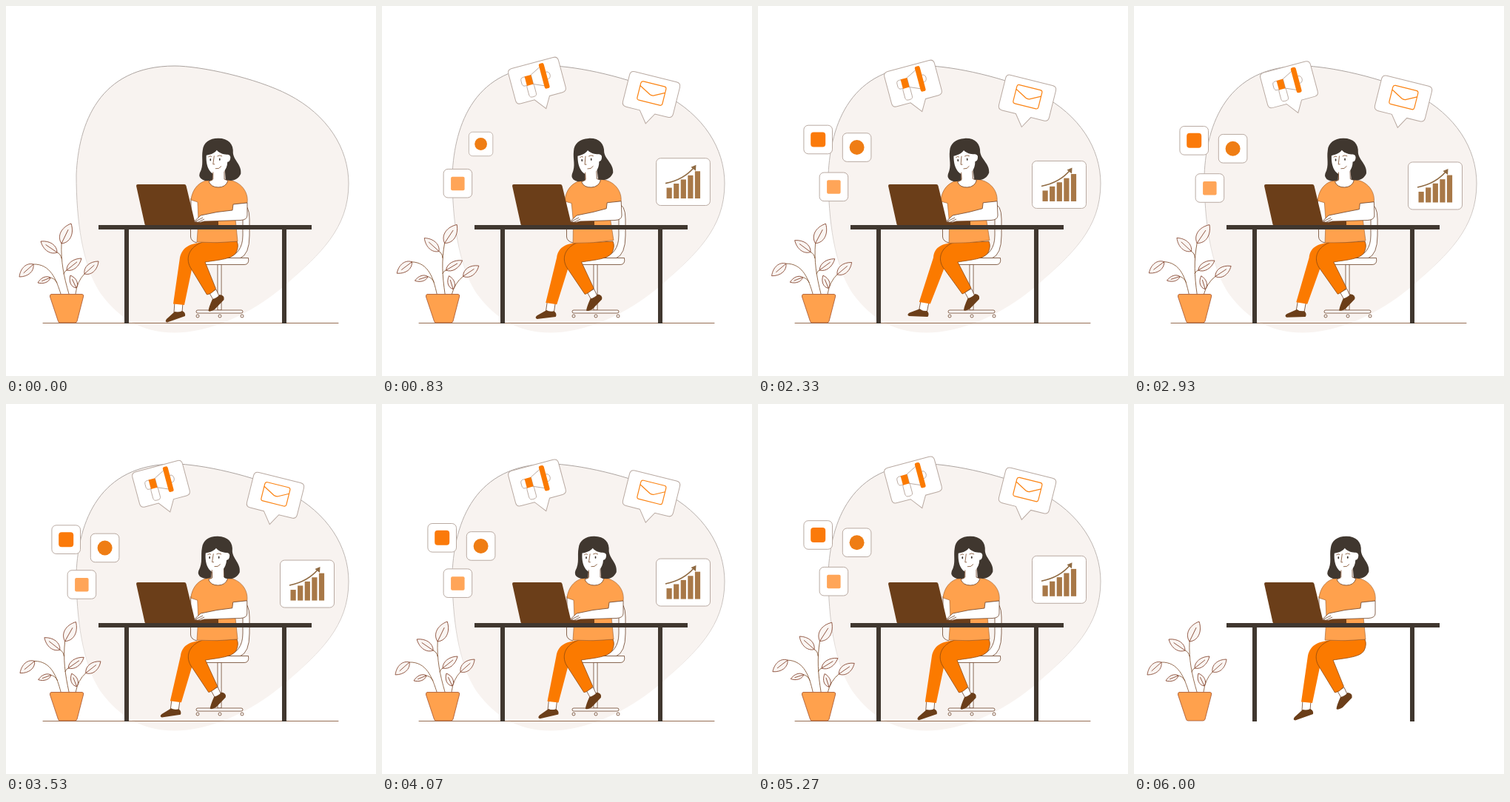
Recreate the animation shown at these times as an HTML page. Size 500x500 px, loop 6.03 s.

```html
<!DOCTYPE html>
<html lang="en">
<head>
<meta charset="utf-8">
<title>Woman working at a desk</title>
<style>
  html, body { margin: 0; width: 100%; height: 100%; overflow: hidden; background: #fff; }
  svg { display: block; width: 100%; height: 100%; }
  .line { fill: none; stroke: #7b4a27; stroke-width: .8; stroke-linecap: round; stroke-linejoin: round; }
  .skin { fill: #fff; stroke: #6b4126; stroke-width: .8; stroke-linejoin: round; }
  .shirt { fill: #ffa14d; }
  .pants { fill: #fb7a00; }
  .shoe, .laptop { fill: #6b3e19; }
  .dark { fill: #40372f; }
  .card { fill: #fff; stroke: #b9aaa2; stroke-width: 1; }
  .leaf { fill: #faf5f2; stroke: #85452f; stroke-width: .8; }
  .thin { fill: #fff; stroke: #b9a9a0; stroke-width: .9; }
</style>
</head>
<body>
<svg viewBox="0 0 500 500">
  <defs>
    <linearGradient id="rim" x1="0" y1="0" x2="0" y2="1">
      <stop offset="0" stop-color="#aaa29e"/>
      <stop offset=".5" stop-color="#c6bfbb"/>
      <stop offset=".8" stop-color="#f8f3f0"/>
    </linearGradient>
    <path id="bubble" class="card" d="M-29-24.5H29Q35-24.5 35-18.5V18.5Q35 24.5 29 24.5H11L2 40L-10 24.5H-29Q-35 24.5-35 18.5V-18.5Q-35-24.5-29-24.5Z"/>
    <rect id="tile" class="card" x="-19.3" y="-19.3" width="38.6" height="38.6" rx="6"/>
  </defs>

  <g id="scene">
    <path fill="#f8f3f0" stroke="url(#rim)" d="M228 81C262 81 338 97 382 120C434 147 463 192 463 240C463 300 425 335 378 376C330 418 272 441 228 441C180 441 150 418 128 388C103 350 95 290 95 228C98 160 125 81 228 81Z"/>
    <path class="line" stroke-width="1" d="M50 428.5H449"/>
    <g class="skin">
      <path d="M318 267Q329 268 329 288V310Q329 336 316 341H296Q320 336 320 310V270Z"/>
      <path fill="none" d="M249.500 275V312Q250 318 258 320"/>
      <rect x="286" y="349" width="5" height="62"/>
      <path d="M268 340.500H327.500Q329 349.500 322 349.500H268Z"/>
      <rect x="257" y="411" width="63" height="4" rx="2"/>
      <circle cx="259" cy="419" r="2"/><circle cx="289" cy="419" r="2"/><circle cx="319" cy="419" r="2"/>
    </g>
  </g>

  <g id="plant"></g>
  <path fill="#ffa14d" stroke="#a2512c" stroke-width=".8" d="M61 389.500H103Q105.500 390 104.500 393L96 426Q95.500 428 93 428H73Q71 428 70.500 426L59.500 393Q59 390 61 389.500Z"/>

  <path class="dark" d="M160 301H166V429H160ZM373 301H379V429H373Z"/>

  <g id="backFoot">
    <path class="skin" d="M228 400L239 401L238 414L227 414Z"/>
    <path id="backShoe" class="shoe" d="M228 413Q233 415 238 412Q243 414 242 419L218 427.500Q214 427 217 423Z"/>
  </g>
  <path id="backLeg" class="pants"/>
  <g id="frontFoot">
    <path class="skin" d="M275 388L284 383L288 392L280 397Z"/>
    <path class="shoe" d="M279 396Q286 395 288.500 390Q296 391 294.500 397L282 410Q275 414 273.500 412Q274 407 279 396Z"/>
  </g>
  <path id="frontLeg" class="pants" stroke="#8d4a10" stroke-width=".8"/>

  <g id="body">
    <path class="skin" d="M250 260L250 284L256 292L264 291L259 262Z"/>
    <path class="shirt" stroke="#9a5a28" stroke-width=".6" d="M276 235C262 236 252 246 250 262L259 265L260 290L258 319Q285 321 313 318L308 268L326 266C328 252 318 237 300 235Z"/>
    <path class="skin" d="M279 221V235L274 237Q277 245 287 245Q297 245 300 236L295 234V218Z"/>
    <g id="head">
      <path class="dark" d="M286 178C300 178 307 186 306 198C307 208 318 214 316.500 226C313 234 305 237 296 234L295 221L279 221L278 234Q271 237 265 234Q259 231 261 225C267 214 263 205 265 194C266 184 274 178 286 178Z"/>
      <path fill="#fff" d="M270 201C276 200 281 198 284 194C288 199 295 200 299 200Q304 201 302 207Q301 210 298.500 210C298 221 291 227.500 284.500 227.500C274 227 269 215 270 201Z"/>
      <path class="line" stroke="#40372f" d="M280.500 202L279 213H281M282.500 219Q287 220 290 216M273 203Q275 201 277 202.500M285 202Q288 200 291 202M279 224V233"/>
      <ellipse class="dark" cx="275.500" cy="207" rx=".9" ry="1.700"/>
      <ellipse class="dark" cx="288" cy="206.500" rx=".9" ry="1.700"/>
    </g>
  </g>

  <path class="laptop" d="M178 241H241Q243 241 243.500 243L255 291H287V297H190Q188 297 187.500 295L176 243Q176 241 178 241Z"/>
  <path id="forearm" class="skin"/>
  <rect class="dark" x="125" y="296" width="288" height="6"/>

  <g id="horn">
    <use href="#bubble"/>
    <rect class="thin" x="-21" y="-9" width="9" height="12" rx="4"/>
    <rect class="thin" x="-15.500" y="2" width="10" height="18" rx="4"/>
    <ellipse class="thin" cx="15" cy="-3" rx="4" ry="5"/>
    <path class="thin" d="M-6-9.500L9-17V10L-6 3.500Z"/>
    <rect class="pants" x="-15" y="-9.500" width="9" height="13"/>
    <rect class="pants" x="7.500" y="-21" width="7" height="35" rx="2.500"/>
  </g>
  <g id="mail">
    <use href="#bubble"/>
    <g fill="none" stroke="#fb8414" stroke-width="1.200">
      <rect x="-17.500" y="-14.500" width="35" height="26" rx="3"/>
      <path d="M-17.500-8L-2 .5Q1 2 4 .5L17.500-6.500"/>
    </g>
  </g>
  <g id="chart">
    <rect class="card" x="-36.500" y="-32" width="73" height="64" rx="6"/>
    <g id="bars" fill="#a87847"></g>
    <path fill="none" stroke="#8f6a42" stroke-width="1.600" d="M-24 2Q1-3 15-20"/>
    <path fill="#8f6a42" d="M17.500-23L17-15L10.500-20Z"/>
  </g>
  <g id="square"><use href="#tile"/><rect x="-9.300" y="-9" width="18.500" height="18.500" rx="2" fill="#ffa558"/></g>
  <g id="disc"><use href="#tile"/><circle r="10" fill="#ef7d14"/></g>
  <g id="rounded"><use href="#tile"/><rect x="-10" y="-10" width="20" height="20" rx="4" fill="#fb7a0a"/></g>
</svg>
<script>
const LOOP = 6030;
const $ = id => document.getElementById(id);
const set = (id, value, name = 'transform') => $(id).setAttribute(name, value);
const clamp = v => Math.max(0, Math.min(1, v));

// Linear interpolation through time/value pairs
function along(t, ...keys) {
  if (t <= keys[0]) return keys[1];
  for (let i = 2; i < keys.length; i += 2) {
    if (t < keys[i]) {
      const p = (t - keys[i - 2]) / (keys[i] - keys[i - 2]);
      return keys[i - 1] + (keys[i + 1] - keys[i - 1]) * p;
    }
  }
  return keys[keys.length - 1];
}

// A pointed leaf from its base to its tip
function leaf(x, y, tipX, tipY, width) {
  const dx = tipX - x, dy = tipY - y, len = Math.hypot(dx, dy);
  const angle = Math.atan2(dy, dx) * 180 / Math.PI;
  return `<path class="leaf" transform="translate(${x} ${y}) rotate(${angle})" d="M0 0C${len * .2} ${-width} ${len * .65} ${-width} ${len} 0C${len * .65} ${width} ${len * .2} ${width} 0 0H${len * .7}"/>`;
}
const stem = d => `<path class="line" stroke="#85452f" d="${d}"/>`;

$('plant').innerHTML =
  `<g id="left">${stem('M74 389C68 370 60 348 37 349M69 374Q65 367 59 367')}${leaf(37, 349, 18, 366, 8)}${leaf(60, 367, 43, 374, 5)}</g>
   <g id="right">${stem('M85 389C78 365 74 345 75 321M75 341Q74 335 69 333M78 362Q79 358 82 357M94 389Q96 372 106 362')}
   ${leaf(75, 321, 88, 294, 10)}${leaf(69, 333, 47, 318, 8)}${leaf(82, 357, 102, 341, 7)}${leaf(106, 362, 125, 345, 8)}${leaf(95, 381, 87, 364, 6)}</g>`;

for (let i = 0; i < 5; i++) {
  const h = 14.5 + i * 5.6;
  $('bars').innerHTML += `<rect x="${-22.5 + i * 9.6}" y="${22.5 - h}" width="7.2" height="${h}"/>`;
}

const cards = [
  { id: 'horn', x: 209.5, y: 100, turn: -15, start: 130, end: 5400, bob: [600, 0, 3600, 8, 6000, 0] },
  { id: 'mail', x: 364, y: 119.5, turn: 14, start: 330, end: 5430, bob: [830, 0, 2750, 6, 3530, 3.8, 4570, -1, 5500, -3] },
  { id: 'chart', x: 407, y: 237.3, turn: 0, start: 635, end: 5460, bob: [700, 0, 3300, 6.6, 5100, 0] },
  { id: 'square', x: 102.4, y: 239.7, turn: 0, start: 530, end: 5430, bob: [830, 0, 2900, 6.4, 4800, 0] },
  { id: 'disc', x: 133.6, y: 188.5, turn: 0, start: 690, end: 5460, bob: [830, -2, 1430, 0, 3550, 6, 4570, 1, 5500, -2] },
  { id: 'rounded', x: 81.2, y: 178.5, turn: 0, start: 860, end: 5490, bob: [830, -1, 1430, 0, 3550, 4.7, 4570, 0, 5500, -2] }
];

function draw(t) {
  $('scene').style.display = t < 6000 ? '' : 'none';

  const sway = (1 - Math.cos(Math.PI * t / 1000)) / 2;
  set('left', `rotate(${sway * 5} 78 390)`);
  set('right', `rotate(${sway * 8.5} 84 390)`);

  const lean = along(t, 0, 0, 400, .5, 830, .85, 1430, 1, 2330, .85, 3000, .45, 3530, .08, 4000, 0);
  set('body', `rotate(${-3.7 * lean} 285 318)`);
  set('head', `translate(.8 .8) rotate(${along(t, 2500, 0, 3530, 1.5, 4570, 0)} 287 185)`);
  const dx = -3.3 * lean, dy = -2.6 * lean;
  set('forearm', `M${326 + dx} ${266 + dy}L${326 + dx * .7} 283Q${326 + dx * .7} 289 ${317 + dx * .7} 289.500L268 291L262 292.500L254 291.500L263 283L285 278.500L${306 + dx} ${276 + dy}L${307 + dx} ${268 + dy}ZM256 291L266 286M260 292L268 288`, 'd');

  // The thighs stay put while the shins swing apart
  const kick = along(t, 0, 0, 400, .3, 830, .58, 1430, .85, 2000, 1, 2400, 1, 3000, .8, 3530, .5, 4570, .13, 5400, 0);
  const back = -8.2 * kick, front = 4.5 * kick;
  set('backFoot', `rotate(${7 * kick} 243 335)`);
  set('backShoe', `rotate(${15 * kick} 233 412)`);
  set('backLeg', `M268 319C245 321 238 328 ${235 + 2 * kick} 340L${226 + back} ${402.5 - 2.6 * kick}L${241 + back} ${404 - 1.5 * kick}L251 356L274 330Z`, 'd');
  set('frontFoot', `translate(${front} ${-kick})`);
  set('frontLeg', `M266 319C248 325 242 340 ${249 + front * .2} 353L${271.5 + front} ${390 - kick}Q278 389 ${283.5 + front} ${382 - kick}L${269 + front * .2} 346C288 343 306 342 311 333Q315 325 312 318Q290 320 266 319Z`, 'd');

  for (const { id, x, y, turn, start, end, bob } of cards) {
    const grow = 1 - (1 - clamp((t - start) / 200)) ** 1.5;
    const size = grow * (1 - clamp((t - end) / 200));
    $(id).style.display = size > 0 ? '' : 'none';
    set(id, `translate(${x} ${y + along(t, ...bob)}) rotate(${turn}) scale(${size})`);
  }
}

const began = performance.now();
function tick() {
  draw((performance.now() - began) % LOOP);
  requestAnimationFrame(tick);
}
tick();
</script>
</body>
</html>
```
